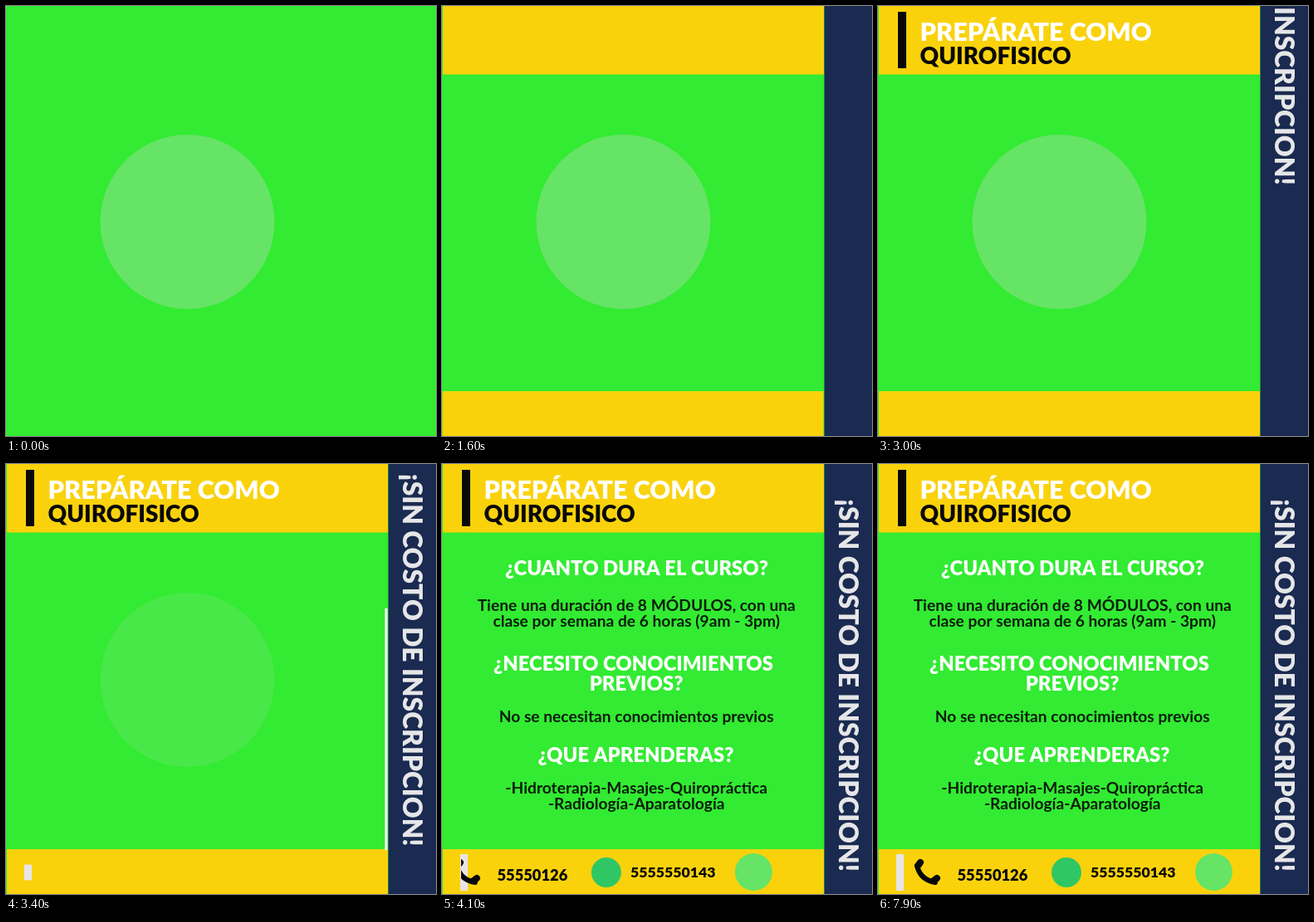
Recreate the animation shown at these times as an HTML page with a canvas. Size 518 by 518 pixels, loop 8 s.

```html
<!DOCTYPE html>
<html lang="es">
<head>
<meta charset="utf-8">
<title>Prepárate como quirofísico</title>
<style>
html, body { margin: 0; width: 100%; height: 100%; overflow: hidden; background: #32eb32; }
canvas { display: block; }
</style>
</head>
<body>
<canvas id="stage" width="518" height="518"></canvas>
<script>
const ctx = document.getElementById('stage').getContext('2d');
const LOOP = 8000;
const GREEN = '#32eb32', YELLOW = '#fad20c', NAVY = '#1a2a50';
const WHITE = '#ffffff', BLACK = '#080808', PALE = '#e6e6e8', EMBLEM = '#66e466';

const span = (t, start, dur) => Math.min(1, Math.max(0, (t - start) / dur));
const outCubic = p => 1 - (1 - p) ** 3;
const outQuad = p => 1 - (1 - p) ** 2;
const inOut = p => (1 - Math.cos(Math.PI * p)) / 2;

function rect(x, y, w, h, color) {
  ctx.fillStyle = color;
  ctx.fillRect(x, y, w, h);
}

function disc(x, y, r, color) {
  ctx.fillStyle = color;
  ctx.beginPath();
  ctx.arc(x, y, r, 0, Math.PI * 2);
  ctx.fill();
}

function text(str, x, y, size, color, weight = 900, align = 'left') {
  ctx.font = `${weight} ${size}px Lato, sans-serif`;
  ctx.textAlign = align;
  ctx.fillStyle = color;
  ctx.fillText(str, x, y);
}

function clipped(x, y, w, h, draw) {
  ctx.save();
  ctx.beginPath();
  ctx.rect(x, y, w, h);
  ctx.clip();
  draw();
  ctx.restore();
}

function bars(t) {
  rect(460.5, -518 * (1 - outCubic(span(t, 50, 750))), 57.5, 518, NAVY);
  const top = outCubic(span(t, 500, 900));
  const bottom = outCubic(span(t, 1150, 500));
  rect(1 - 460 * (1 - top), 0, 459, 82.5, YELLOW);
  rect(1 - 460 * (1 - bottom), 464, 459, 54, YELLOW);
}

function emblem(t) {
  ctx.globalAlpha = 1 - span(t, 3200, 350);
  disc(218.5, 260, 105, EMBLEM);
  ctx.globalAlpha = 1;
}

function title(t) {
  const grow = outCubic(span(t, 1850, 450));
  rect(24, 41 - 34 * grow, 10, 68 * grow, BLACK);
  const dx = -306 * (1 - outCubic(span(t, 2300, 650)));
  clipped(27, 0, 433, 82, () => {
    text('PREPÁRATE COMO', 50.5 + dx, 42, 30.7, WHITE);
    text('QUIROFISICO', 50.5 + dx, 69.5, 27.9, BLACK);
  });
}

function sideText(t) {
  const dy = -491 * (1 - outQuad(span(t, 2800, 800)));
  ctx.save();
  ctx.translate(477.5, 491 + dy);
  ctx.rotate(Math.PI / 2);
  text('¡SIN COSTO DE INSCRIPCION!', 0, 0, 31.8, PALE, 900, 'right');
  ctx.restore();
}

function questions() {
  const head = (s, x, y) => text(s, x, y, 23.85, WHITE, 900, 'center');
  const body = (s, y) => text(s, 234.2, y, 19.2, '#0a1e0a', 700, 'center');
  head('¿CUANTO DURA EL CURSO?', 234.5, 133.5);
  body('Tiene una duración de 8 MÓDULOS, con una', 176.5);
  body('clase por semana de 6 horas (9am - 3pm)', 195.5);
  head('¿NECESITO CONOCIMIENTOS', 230.5, 248.5);
  head('PREVIOS?', 234, 272.5);
  body('No se necesitan conocimientos previos', 310.5);
  head('¿QUE APRENDERAS?', 233.5, 358.5);
  body('-Hidroterapia-Masajes-Quiropráctica', 396.5);
  body('-Radiología-Aparatología', 416);
}

// The line sweeps left and uncovers the text on its right.
function reveal(t) {
  const sweep = inOut(span(t, 3600, 450));
  const x = 458 - 456 * sweep;
  if (sweep > 0) clipped(x, 83, 460 - x, 381, questions);
  const grow = outCubic(span(t, 3300, 300));
  if (sweep < 1) rect(x - 1.5, 465 - 411 * grow, 3, 411 * grow, WHITE);
}

function handset() {
  ctx.strokeStyle = BLACK;
  ctx.lineCap = 'round';
  const stroke = (w, path) => {
    ctx.lineWidth = w;
    ctx.beginPath();
    path();
    ctx.stroke();
  };
  stroke(6, () => { ctx.moveTo(47, 484); ctx.quadraticCurveTo(51, 501, 69, 504); });
  stroke(8, () => { ctx.moveTo(48, 484); ctx.lineTo(51, 480); });
  stroke(8, () => { ctx.moveTo(67, 502); ctx.lineTo(71, 499); });
}

function footer(t) {
  const grow = outCubic(span(t, 3350, 300));
  rect(22, 492 - 22 * grow, 9, 44 * grow, PALE);
  const dx = -416 * (1 - inOut(span(t, 3570, 640)));
  clipped(23, 464, 437, 54, () => {
    ctx.translate(dx, 0);
    handset();
    text('55550126', 95.5, 501.5, 18.3, BLACK);
    disc(227, 492, 18, '#2fc764');
    text('5555550143', 256, 497.5, 17.7, BLACK);
    disc(404.5, 491.5, 22.5, EMBLEM);
  });
}

function frame(now) {
  const t = now % LOOP;
  rect(0, 0, 518, 518, GREEN);
  emblem(t);
  bars(t);
  title(t);
  sideText(t);
  reveal(t);
  footer(t);
}

const start = performance.now();
function tick() {
  frame(performance.now() - start);
  requestAnimationFrame(tick);
}
tick();
</script>
</body>
</html>
```
